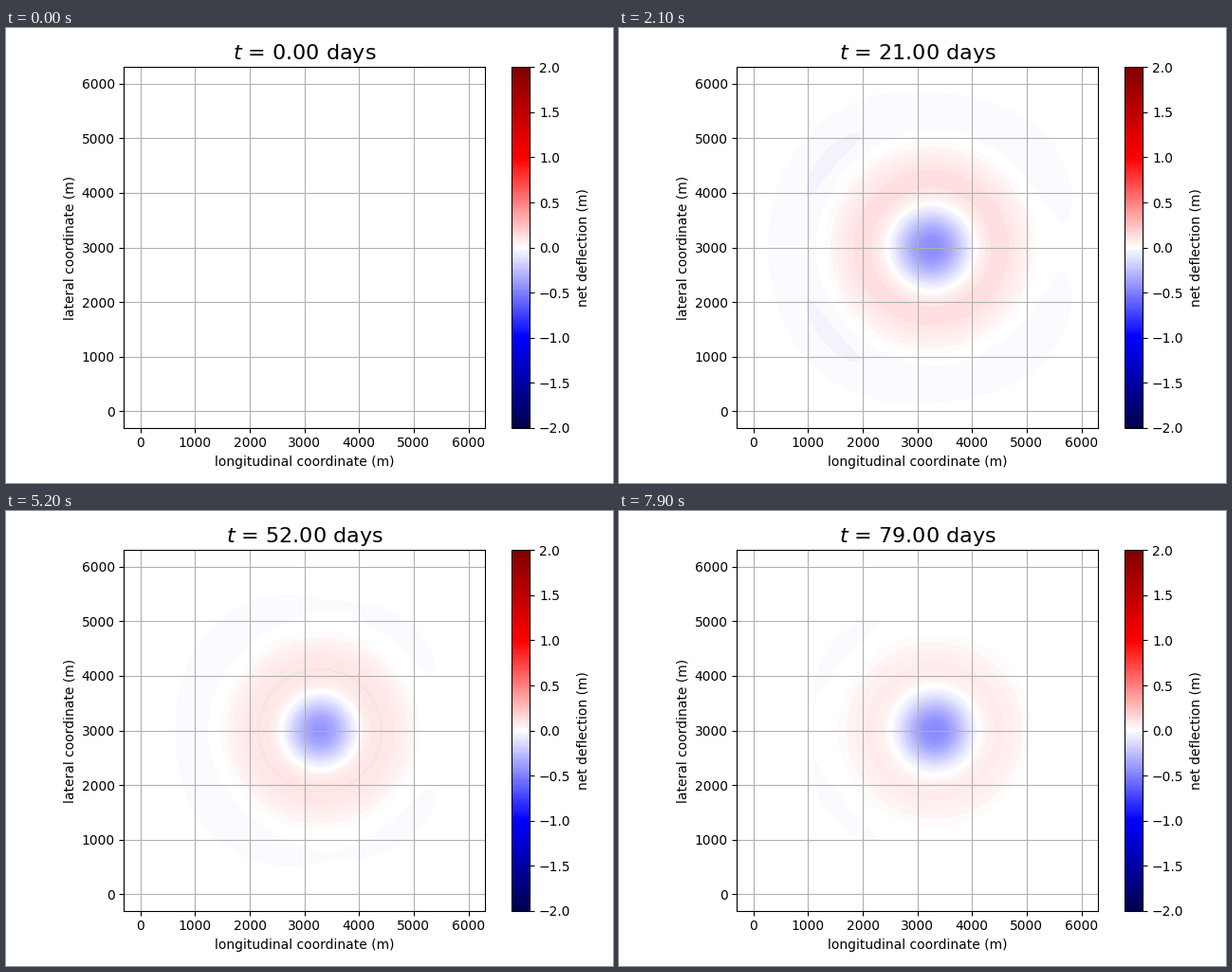
Write a matplotlib script that moves like this. It is 640 by 480 pixels and loops after 8000 ms.

```python
import numpy as np
import matplotlib.pyplot as plt
from matplotlib.animation import FuncAnimation

plt.rcParams["font.family"] = "DejaVu Sans"
W, H, DPI = 640, 480, 100
FRAMES, INTERVAL = 80, 100
LEVELS = np.linspace(-2, 2, 200)
# an odd number of colours keeps zero pure white
CMAP = plt.get_cmap("seismic").resampled(255)

DRAINS = (16, 36, 49.5, 63, 76.5, 90)  # days on which the load empties
KEY_DAYS = (0, 12, 21, 34, 47, 79)
DEPTH = (0, 0.44, 0.75, 1.0, 0.65, 0.65)
WIDTH = (760, 760, 775, 747, 670, 680)
CENTRE = (3180, 3208, 3255, 3260, 3280, 3320)

axis = np.linspace(0, 6000, 151)
X, Y = np.meshgrid(axis, axis)


def flexure(day):
    """Amplitude and radius (m) of the broad flexural response."""
    if day < DRAINS[0]:
        return -0.0233 * day, 1650
    i = np.searchsorted(DRAINS, day, side="right") - 1
    age = (day - DRAINS[i]) / (DRAINS[i + 1] - DRAINS[i])
    rebound = 0.5 * np.exp(-DRAINS[i] / 98)
    radius = 1840 + 205 * np.exp(-(day - DRAINS[0]) / 25)
    return rebound * max(0, 1 - age / 0.85), radius


def deflection(day):
    """Net deflection: a narrow dimple plus the flexural response."""
    depth, width, centre = (
        np.interp(day, KEY_DAYS, key) for key in (DEPTH, WIDTH, CENTRE))
    uplift, radius = flexure(day)
    dx, dy = X - centre, Y - 3000
    r, theta = np.hypot(dx, dy), np.arctan2(dy, dx)
    q = r / radius
    flex = (1 - q**2) * np.exp(-(q / 1.1)**4)
    # the outer moat is uneven around the centre
    uneven = 0.65 - 0.25 * np.cos(theta) - 0.15 * np.cos(4 * theta)
    flex = np.where(q > 1, flex * uneven * abs(uplift) / 0.28, flex)
    return uplift * flex - depth * np.exp(-(r / width)**2.2)


def place(left, bottom, width, height):
    return fig.add_axes((left / W, bottom / H, width / W, height / H))


fig = plt.figure(figsize=(W / DPI, H / DPI), dpi=DPI)
ax = place(124.44, 58.24, 380.4, 380.4)
cax = place(533.2, 58.24, 19.02, 380.4)

ax.set(xlim=(-300, 6300), ylim=(-300, 6300),
       xticks=range(0, 6001, 1000), yticks=range(0, 6001, 1000),
       xlabel="longitudinal coordinate (m)", ylabel="lateral coordinate (m)")
ax.grid(True)
title = ax.set_title("", fontsize=16)


def contours(day):
    return ax.contourf(X, Y, deflection(day), levels=LEVELS, cmap=CMAP,
                       vmin=-2, vmax=2)


current = contours(0)
fig.colorbar(current, cax=cax, ticks=np.arange(-2, 2.1, 0.5),
             label="net deflection (m)")


def update(day):
    global current
    current.remove()
    current = contours(day)
    title.set_text(f"$t$ = {day:.2f} days")
    return current, title


anim = FuncAnimation(fig, update, frames=FRAMES, interval=INTERVAL,
                     repeat=True, repeat_delay=0, blit=False)
plt.show()
```
